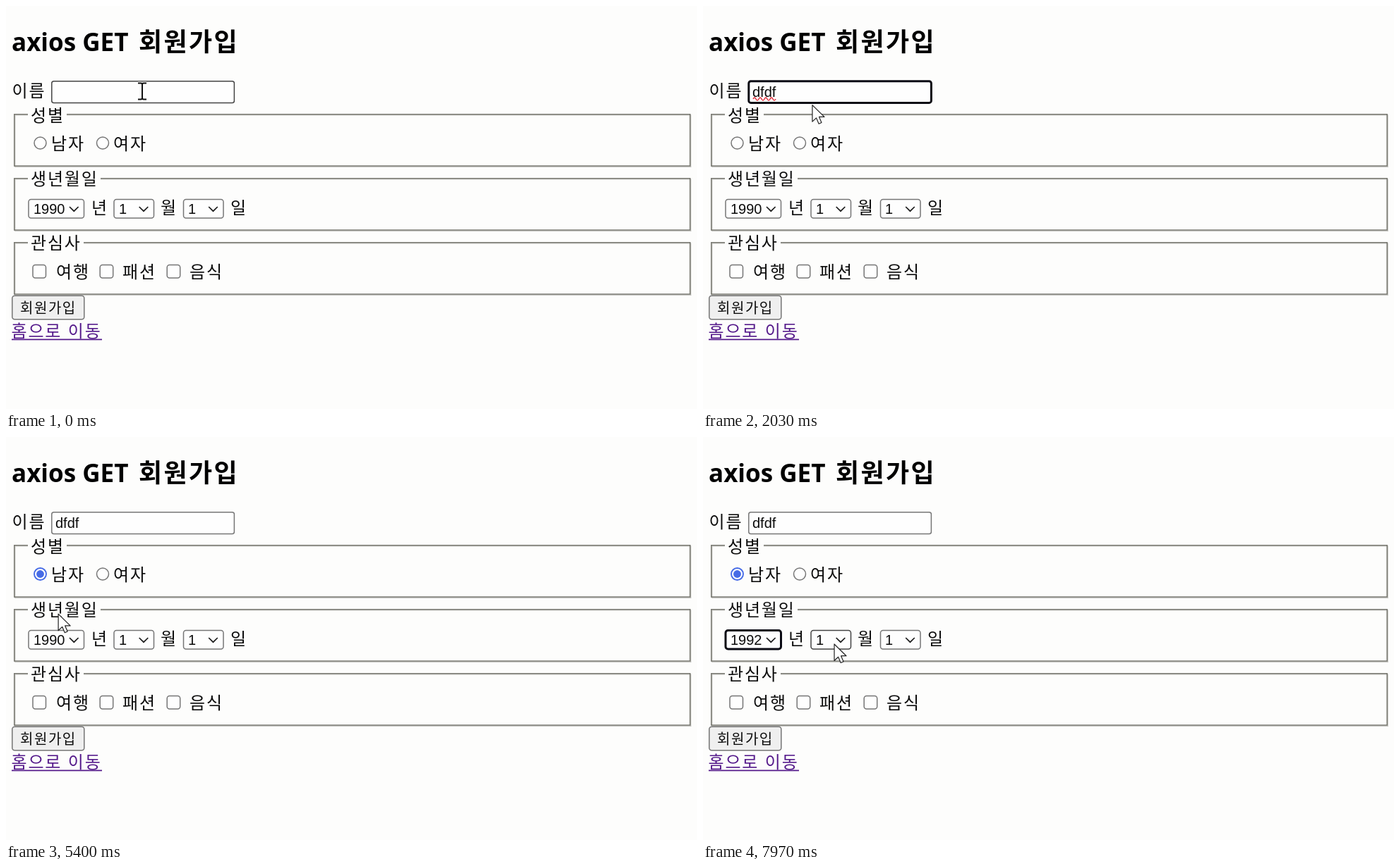
These frames come from a looping animation (979 by 572 pixels, 8 s). An HTML page:

```html
<!DOCTYPE html>
<html lang="ko">
<head>
<meta charset="utf-8">
<title>회원가입</title>
<style>
  html, body { margin: 0; width: 100%; height: 100%; overflow: hidden; background: #fdfdfc; }
  svg { display: block; width: 979px; height: 572px; }
  text { font: 24px "Noto Sans CJK KR", "Noto Sans CJK", sans-serif; letter-spacing: 1.85px; fill: #0c0c0c; white-space: pre; }
  .arial { font: 20px "Liberation Sans", Arial, sans-serif; letter-spacing: 0; }
  .title { font-size: 36px; font-weight: 700; letter-spacing: 2.4px; fill: #000; }
  .latin { font: 700 35px "Open Sans", sans-serif; letter-spacing: 0; }
  .small { font-size: 20px; letter-spacing: 1.55px; }
  .link { fill: #551a8b; }
  .box { fill: #fefefe; stroke: #767676; stroke-width: 1.5; }
  .box.hover { stroke: #444; }
  .box.focus { stroke: #0b0b14; stroke-width: 3; }
  .box.on { stroke: #466be6; stroke-width: 1.9; }
  .gap { fill: #fdfdfc; }
  .line { fill: none; stroke: #1c1c1c; stroke-width: 1.7; }
  #list { filter: drop-shadow(0 10px 14px rgba(0, 0, 0, .4)); }
  .picked { fill: #fff; }
</style>
</head>
<body>
<svg viewBox="0 0 979 572">
  <defs>
    <g id="frame" fill="none">
      <path d="M12.8 1.8H970.3V75.3H12.8Z" stroke="#c8c8c4" stroke-width="1.3"/>
      <path d="M11.8 .7H969.2V74H11.8Z" stroke="#77776f" stroke-width="1.5"/>
    </g>
    <path id="chevron" class="line" d="M0 0L6.3 6.2L12.6 0"/>
  </defs>

  <text class="title latin" x="8" y="64">axios GET</text>
  <text class="title" x="188" y="64">회원가입</text>

  <text x="8.5" y="129">이름</text>
  <rect id="name" class="box" x="64.8" y="106.8" width="258.6" height="30.6" rx="3"/>
  <text id="typed" class="arial" x="70" y="129"></text>
  <path id="squiggle" fill="none" stroke="#e0303c" stroke-width="1.5"
    d="M71 132q2-4 4 0t4 0t4 0t4 0t4 0t4 0t4 0t4 0"/>
  <path id="caret" d="M104.3 112V133" stroke="#000" stroke-width="1.5"/>

  <use href="#frame" y="153"/>
  <rect class="gap" x="31" y="150" width="55" height="10"/>
  <text x="35" y="164">성별</text>
  <circle id="male" class="box" cx="48.5" cy="194.5" r="8.5"/>
  <circle id="dot" cx="48.5" cy="194.5" r="5.4" fill="#466be6"/>
  <text x="64" y="204">남자</text>
  <circle class="box" cx="137" cy="194.5" r="8.5"/>
  <text x="152" y="204">여자</text>

  <use href="#frame" y="244"/>
  <rect class="gap" x="31" y="241" width="103" height="10"/>
  <text x="35" y="254">생년월일</text>
  <rect id="year" class="box" x="32" y="274.5" width="78.5" height="26.5" rx="3.5"/>
  <text id="yearText" class="arial" x="39" y="295">1990</text>
  <use href="#chevron" x="90" y="285"/>
  <text x="121" y="295">년</text>
  <rect id="month" class="box" x="153" y="274.5" width="56.5" height="26.5" rx="3.5"/>
  <text class="arial" x="160" y="295">1</text>
  <use href="#chevron" x="188.7" y="285"/>
  <text x="219" y="295">월</text>
  <rect class="box" x="251.5" y="274.5" width="56.5" height="26.5" rx="3.5"/>
  <text class="arial" x="258" y="295">1</text>
  <use href="#chevron" x="287.2" y="285"/>
  <text x="318" y="295">일</text>

  <use href="#frame" y="335"/>
  <rect class="gap" x="31" y="332" width="79" height="10"/>
  <text x="35" y="345">관심사</text>
  <rect class="box" x="38" y="367.5" width="18.5" height="18.5" rx="3.5"/>
  <text x="71" y="386">여행</text>
  <rect class="box" x="133.2" y="367.5" width="18.5" height="18.5" rx="3.5"/>
  <text x="165" y="386">패션</text>
  <rect class="box" x="228.2" y="367.5" width="18.5" height="18.5" rx="3.5"/>
  <text x="260" y="386">음식</text>

  <rect class="box" x="8.8" y="411.3" width="102" height="33.5" rx="3.5" style="fill:#efefef"/>
  <text class="small" x="20" y="436">회원가입</text>
  <text class="link" x="7.5" y="470">홈으로 이동</text>
  <path d="M8 473.3H136" stroke="#551a8b" stroke-width="1.7"/>

  <g id="list">
    <path d="M32 303H109V563Q109 571.5 100 571.5H41Q32 571.5 32 563Z" fill="#fefefe" stroke="#aaa" stroke-width=".8"/>
    <rect id="mark" x="32" width="77" height="24.5" fill="#4560c6"/>
  </g>

  <path id="arrow" fill="#fff" stroke="#222" stroke-width="1.2" stroke-linejoin="round"
    d="M0 0V23.5L5.6 18.2L9.2 26.5L13 24.8L9.6 16.7H17Z"/>
  <g id="beam" fill="none">
    <path d="M-6-11.5H-2Q0-11.5 0-9.5Q0-11.5 2-11.5H6M0-10V10M-6 11.5H-2Q0 11.5 0 9.5Q0 11.5 2 11.5H6" stroke="#fff" stroke-width="4"/>
    <path d="M-6-11.5H-2Q0-11.5 0-9.5Q0-11.5 2-11.5H6M0-10V10M-6 11.5H-2Q0 11.5 0 9.5Q0 11.5 2 11.5H6" stroke="#111" stroke-width="2"/>
  </g>
</svg>
<script>
const LOOP = 8000, ROW = 24.5, LIST_TOP = 302.5;
const $ = id => document.getElementById(id);
const show = (id, on) => { $(id).style.display = on ? '' : 'none'; };
const mark = (id, name, on) => $(id).classList.toggle(name, on);

// Pointer stops: time, x, y
const stops = [
  [0, 193, 121], [1750, 193, 121], [2600, 44, 198], [3500, 44, 198],
  [4100, 52, 194], [4950, 52, 194], [5700, 86, 282], [6150, 86, 282],
  [6750, 76, 361], [7100, 76, 361], [7800, 186, 294], [LOOP, 186, 294]
];
const keyTimes = [660, 790, 920, 1050];

const rows = Array.from({ length: 11 }, (_, i) => {
  const row = document.createElementNS('http://www.w3.org/2000/svg', 'text');
  row.setAttribute('class', 'arial');
  row.setAttribute('x', 37);
  row.setAttribute('y', 320 + i * ROW);
  row.textContent = 1990 + i;
  return $('list').appendChild(row);
});

function pointerAt(t) {
  const i = stops.findIndex(s => s[0] > t);
  const [t0, x0, y0] = stops[i - 1], [t1, x1, y1] = stops[i];
  const p = (t - t0) / (t1 - t0), e = p * p * (3 - 2 * p);
  return [x0 + (x1 - x0) * e, y0 + (y1 - y0) * e];
}

function draw(t) {
  const [x, y] = pointerAt(t);
  const within = (l, top, r, b) => x >= l && x <= r && y >= top && y <= b;
  const overName = within(64, 106, 324, 138);
  const focused = t >= 320 && t < 4420;
  const checked = t >= 4580;
  const open = t >= 5900 && t < 6960;
  const chosen = t >= 7050;

  const typed = keyTimes.filter(k => t >= k).length;
  $('typed').textContent = 'dfdf'.slice(0, typed);
  const blink = t < 660 ? t < 640 : t >= 1100 && (t - 1060) % 1000 < 500;
  show('caret', focused && blink);
  $('caret').setAttribute('transform', `translate(${typed ? 0 : -33.4})`);
  show('squiggle', focused && t >= 1600);
  mark('name', 'focus', focused);
  mark('name', 'hover', overName);

  mark('male', 'hover', within(39, 185, 58, 204));
  mark('male', 'on', checked);
  show('dot', checked);

  mark('year', 'hover', within(31, 274, 111, 302) || (t >= 6960 && !chosen));
  mark('year', 'focus', chosen);
  $('yearText').textContent = chosen ? 1992 : 1990;
  mark('month', 'hover', within(152, 274, 210, 302));

  show('list', open);
  const active = Math.max(0, Math.floor((y - LIST_TOP) / ROW));
  $('mark').setAttribute('y', LIST_TOP + active * ROW);
  rows.forEach((row, i) => row.classList.toggle('picked', i === active));

  show('beam', overName);
  show('arrow', !overName);
  $(overName ? 'beam' : 'arrow').setAttribute('transform', `translate(${x} ${y})`);
}

const start = performance.now();
function tick() {
  draw((performance.now() - start) % LOOP);
  requestAnimationFrame(tick);
}
tick();
</script>
</body>
</html>
```
